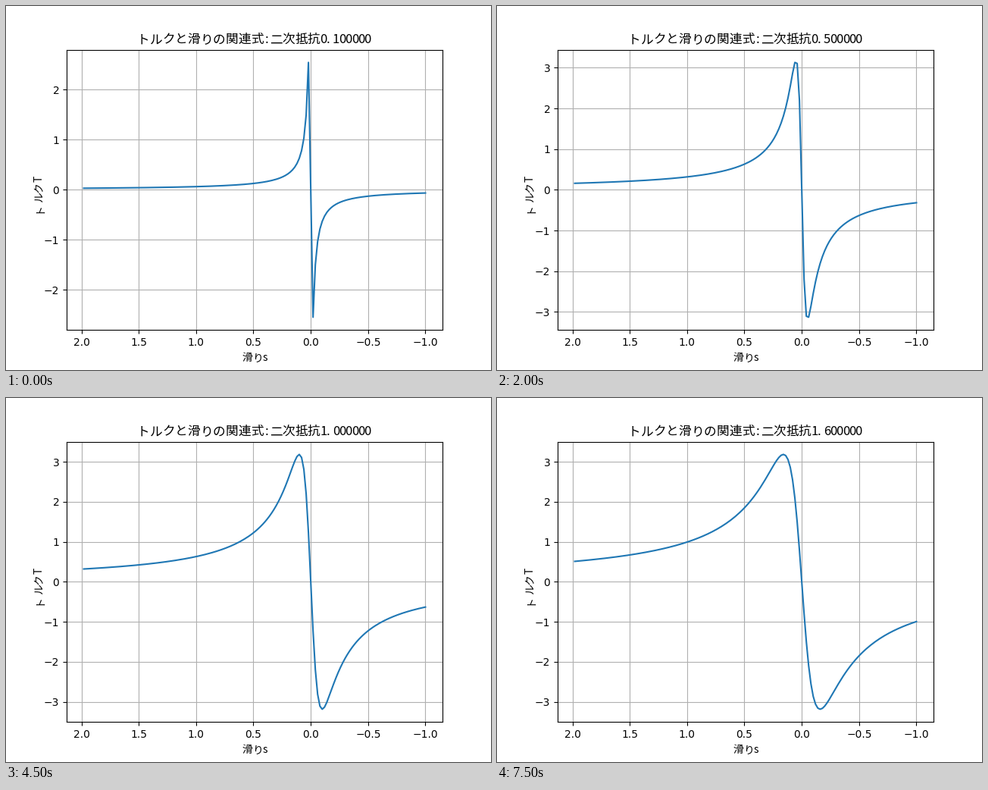
A matplotlib script for the animation above (8 s loop, 640 px wide and 480 px high).

```python
import numpy as np
import matplotlib.pyplot as plt
from matplotlib.animation import FuncAnimation

W, H, DPI = 640, 480, 100
FRAMES, INTERVAL = 16, 500
REACTANCE = 10.0
GAIN = 200 / np.pi

slip = np.arange(-1, 2, 0.02)


def torque(r):
    return GAIN * r * slip / (r**2 + (REACTANCE * slip)**2)


def fixed_pitch(x, y, text, size, rotation=0):
    """Set text on a grid: full-width cells of one em, ASCII cells of half an em."""
    em = size * DPI / 72
    cells = []
    for ch in text:
        shift = 0.11 * em if ch == ":" else -0.025 * em if ch.isascii() else 0
        dx, dy = (0, -shift) if rotation else (shift, 0)
        cells.append(fig.text((x + dx) / W, 1 - (y + dy) / H, ch, size=size,
                              family="Noto Sans CJK JP", rotation=rotation,
                              rotation_mode="anchor", ha="left", va="baseline"))
        step = em / 2 if ch.isascii() else em
        if rotation:
            y -= step
        else:
            x += step
    return cells


def title_text(r):
    return f"トルクと滑りの関連式:二次抵抗{r:f}"


fig, ax = plt.subplots(figsize=(W / DPI, H / DPI), dpi=DPI)
line, = ax.plot(slip, torque(0.1))
ax.invert_xaxis()
ax.grid()

title = fixed_pitch(172.8, 49.3, title_text(0.1), 12)
fixed_pitch(311, 467.8, "滑りs", 10)
fixed_pitch(47.3, 273.3, "トルクT", 10, rotation=90)


def update(i):
    r = (i + 1) / 10
    line.set_ydata(torque(r))
    ax.relim()
    ax.autoscale_view(scalex=False)
    for cell, ch in zip(title, title_text(r)):
        cell.set_text(ch)
    return [line, *title]


anim = FuncAnimation(fig, update, frames=FRAMES, interval=INTERVAL,
                     repeat=True, repeat_delay=0, blit=False)
plt.show()
```
